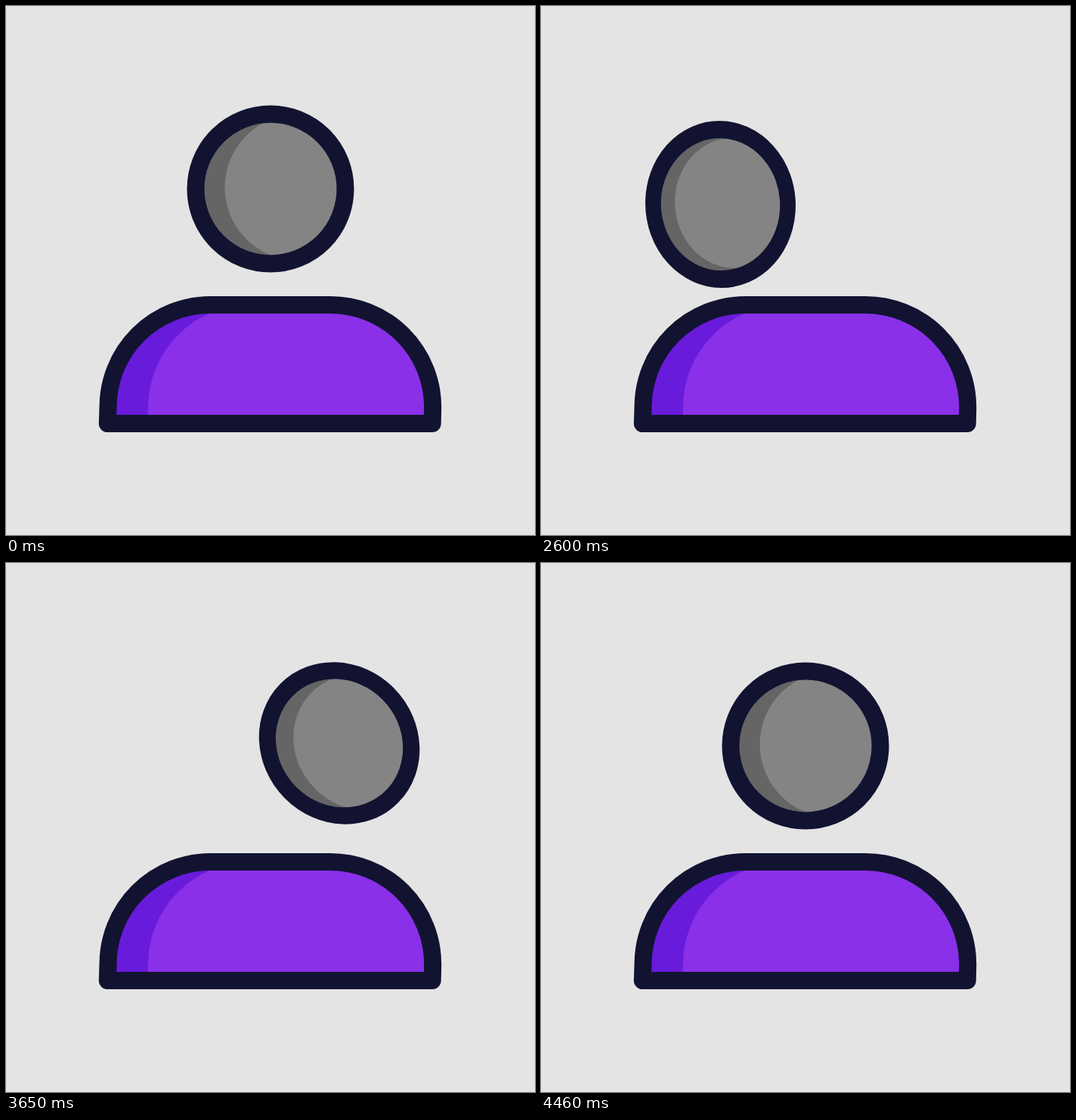
Write an HTML page that moves like this. It is 700 px wide and 700 px high and loops after 4.55 s.

```html
<!DOCTYPE html>
<html lang="en">
<head>
<meta charset="utf-8">
<title>Avatar</title>
<style>
html, body { margin: 0; height: 100%; overflow: hidden; background: #e4e4e4; }
svg { display: block; width: 100vw; height: 100vh; }
.line { fill: none; stroke: #121331; stroke-width: 23; stroke-linejoin: round; }
</style>
</head>
<body>
<svg viewBox="0 0 700 700">
  <clipPath id="face"><circle r="99"/></clipPath>
  <path id="shade" fill="#691bdc"/>
  <path id="light" fill="#8930e8"/>
  <path id="outline" class="line"/>
  <g id="head">
    <circle r="99" fill="#656565"/>
    <g clip-path="url(#face)"><circle id="glow" cy="-2" fill="#848484"/></g>
    <circle r="99" class="line"/>
  </g>
</svg>
<script>
const LOOP = 4550, START = 2030;

const phase = (t, from, to) => Math.min(1, Math.max(0, (t - from) / (to - from)));
const smooth = (t, from, to) => { const u = phase(t, from, to); return u * u * (3 - 2 * u); };
const pulse = (t, from, to) => Math.sin(Math.PI * phase(t, from, to));
const rise = (t, from, to) => 1 - (1 - phase(t, from, to)) ** 2;
const fall = (t, from, to) => phase(t, from, to) ** 2;
const hop = (t, start, peak, land) => rise(t, start, peak) - fall(t, peak, land);

function set(id, attributes) {
  const node = document.getElementById(id);
  for (const name in attributes) node.setAttribute(name, attributes[name]);
}

function bodyPath(left, stretch) {
  const top = 395.5 - 47 * stretch, side = top + 135.5, bottom = 552.5 - 10 * stretch;
  return `M${left - .7} ${bottom}L${left} ${side}A135.5 135.5 0 0 1 ${left + 135.5} ${top}` +
    `H429.2A135.5 135.5 0 0 1 564.7 ${side}L564.2 ${bottom}Z`;
}

function drawBody(t) {
  const stretch = hop(t, 2010, 2200, 2510) + hop(t, 3660, 3990, 4280);
  const d = bodyPath(135, stretch);
  set("shade", { d });
  set("outline", { d });
  set("light", { d: bodyPath(188, stretch) });
}

function drawHead(t) {
  // Hop to the left shoulder, slide over to the right one, hop back
  const hopOut = hop(t, 1988, 2200, 2540), hopBack = hop(t, 3600, 3990, 4280);
  const landing = pulse(t, 2480, 2720), launch = pulse(t, 3550, 3750);
  const seated = fall(t, 2200, 2540) - pulse(t, 3010, 3350) - rise(t, 3600, 3990);

  const x = 350 - 100 * smooth(t, 2200, 2560) - 12.5 * landing - 10 * pulse(t, 2930, 3080)
    + 193 * smooth(t, 3080, 3350) - 93 * smooth(t, 3620, 3980);
  const y = 242 + 20.5 * seated - 84 * hopOut - 78 * hopBack;
  const sx = 1 - .1 * landing - .039 * launch;
  const sy = 1 - .09 * (hopOut + hopBack) - .008 * launch;
  const skew = .007 * landing + .037 * launch - .0165 * pulse(t, 3880, 4080);
  const glow = landing + .4 * launch;

  set("head", { transform: `matrix(${sx} ${skew} ${skew} ${sy} ${x} ${y})` });
  set("glow", { cx: 36.2 - 17 * glow, r: 96.7 - 10.5 * glow });
}

const begin = performance.now();
function frame() {
  const elapsed = (performance.now() - begin) % LOOP;
  const t = elapsed < START ? 0 : elapsed;
  drawBody(t);
  drawHead(t);
  requestAnimationFrame(frame);
}
frame();
</script>
</body>
</html>
```
